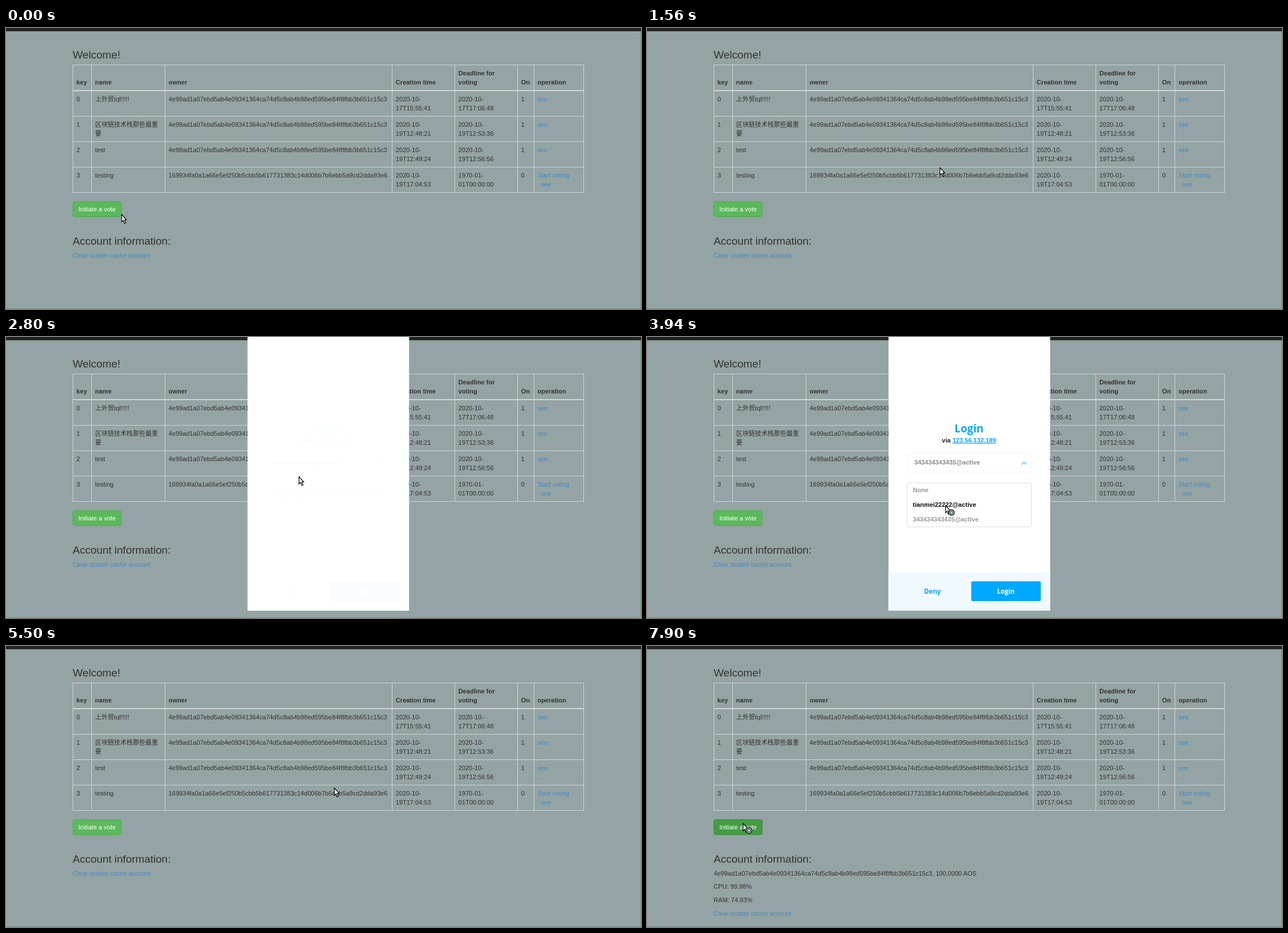
These frames come from a looping animation (1124 px wide and 498 px high, 8000 ms). An HTML page:

```html
<!DOCTYPE html>
<html lang="en">
<head>
<meta charset="utf-8">
<title>Voting page</title>
<style>
html, body { margin: 0; width: 100%; height: 100%; overflow: hidden; background: #94a3a3; }
svg { display: block; width: 100vw; height: 100vh; }
text { font: 11.11px "Liberation Sans", Arial, "Noto Sans CJK SC", "Noto Sans CJK", sans-serif; fill: #333; white-space: pre; }
.b { font-weight: 700; }
.h { font-size: 19.05px; }
.link { fill: #428bca; }
.white { fill: #fff; }
.grid path { fill: none; stroke: #cfd6d6; }
#popup text { fill: #222; font-weight: 700; }
#popup .blue { fill: #00a8ff; }
#popup .os { font-family: "Open Sans", sans-serif; font-size: 11.5px; }
#popup .title { font-size: 19.05px; }
#popup .white { fill: #fff; }
#popup .note { font-size: 10.32px; font-weight: 400; fill: #999; }
.mid { text-anchor: middle; }
</style>
</head>
<body>
<svg viewBox="0 0 1124 498" preserveAspectRatio="none">
  <rect width="1124" height="498" fill="#94a3a3"/>
  <path d="M1123.5 6V497.5H0" fill="none" stroke="#7f8c8c"/>
  <rect width="1124" height="5.7" fill="#222"/>
  <text class="h" x="118" y="54">Welcome!</text>
  <g id="full" class="grid"></g>
  <g id="empty" class="grid"></g>
  <g id="below">
    <rect id="vote" x="118.5" y="307.8" width="85.5" height="26.5" rx="3"/>
    <text class="white mid" x="161.2" y="325">Initiate a vote</text>
    <text class="h" x="118" y="384">Account information:</text>
    <g id="account"></g>
    <text id="clear" class="link" x="118" y="406.5">Clear scatter cache account</text>
  </g>
  <g id="popup">
    <rect x="427.5" y="-10" width="286" height="495" fill="#fff"/>
    <g id="content">
      <text class="os title blue mid" x="570" y="169">Login</text>
      <text class="mid" x="570" y="187">via <tspan class="blue" text-decoration="underline">123.56.132.189</tspan></text>
      <g id="field">
        <rect x="460.5" y="205.5" width="220" height="34" rx="3" fill="#fff" stroke="#e9e9e9"/>
        <text id="chosen" x="473" y="226"></text>
        <path id="chevron" fill="none" stroke="#00a8ff" stroke-width="1.8"/>
      </g>
      <text class="note mid" x="570" y="274">By logging into this application you will be</text>
      <text class="note mid" x="570" y="286">allowing it to interact with your Scatter.</text>
      <g id="menu">
        <rect x="460.5" y="258.5" width="220" height="78" rx="3" fill="#fff" stroke="#dcdcdc"/>
      </g>
      <rect x="427.5" y="417.5" width="286" height="67.5" fill="#f0f9ff"/>
      <text class="os blue mid" x="505.3" y="455">Deny</text>
      <rect id="login" x="574" y="433" width="123" height="35" rx="2"/>
      <text class="os white mid" x="635.3" y="455">Login</text>
    </g>
  </g>
  <g id="cursor">
    <path d="M.6 .6V13.4L3.5 10.8 5.6 16.2 7.8 15.2 5.7 10H9Z" fill="#fff" stroke="#000" stroke-width="1.2"/>
    <g id="badge" fill="#dcefe6">
      <circle cx="11" cy="13" r="5" stroke="#111" stroke-width="1.4"/>
      <circle cx="11" cy="13" r="2.5" stroke="#1d6b58" stroke-width="1.5"/>
    </g>
  </g>
</svg>
<script>
const $ = id => document.getElementById(id);
const label = (s, x, y, cls = '') => `<text class="${cls}" x="${x}" y="${y}">${s}</text>`;
const opacity = (id, v) => $(id).setAttribute('opacity', +v);
const ramp = (t, from, to) => Math.min(1, Math.max(0, (t - from) / (to - from)));
const within = (t, from, to) => t >= from && t < to;

// Table cells break into lines at "|"
const hash = '4e99ad1a07ebd5ab4e09341364ca74d5c8ab4b98ed595be84f8fbb3b651c15c3';
const heads = ['key', 'name', 'owner', 'Creation time', 'Deadline for voting', 'On', 'operation'];
const rows = [
  ['0', '上外贸tql!!!!!', hash, '2020-10-|17T15:55:41', '2020-10-|17T17:06:48', '1', 'see'],
  ['1', '区块链技术栈那些最重|要', hash, '2020-10-|19T12:48:21', '2020-10-|19T12:53:36', '1', 'see'],
  ['2', 'test', hash, '2020-10-|19T12:49:24', '2020-10-|19T12:56:56', '1', 'see'],
  ['3', 'testing', '169934fa0a1a66e5ef250b5cbb5b617731383c14d006b7b6ebb5a9cd2dda93e6',
    '2020-10-|19T17:04:53', '1970-01-|01T00:00:00', '0', 'Start voting|  see']
];

function table(id, widths, headEnd, body) {
  const scale = 904 / widths.reduce((a, b) => a + b);
  const edges = [118.5];
  widths.forEach((w, i) => edges.push(edges[i] + w * scale));
  const line = y => `M118 ${y}H1023`;
  let d = line(65.5) + line(headEnd - 1) + line(headEnd), out = '';
  edges.forEach(x => d += `M${Math.floor(x) + .5} 65V${headEnd + 45 * body.length}`);
  heads.forEach((s, c) => {
    const lines = body.length ? s.replace('for ', 'for|').split('|') : [s];
    lines.reverse().forEach((l, i) => out += label(l, edges[c] + 6.3, headEnd - 11.5 - 16 * i, 'b'));
  });
  body.forEach((row, r) => {
    d += line(headEnd + 45 * (r + 1));
    row.forEach((cell, c) => cell.split('|').forEach((l, i) =>
      out += label(l, edges[c] + 6.3, headEnd + 18 + 45 * r + 16 * i, c === 6 ? 'link' : '')));
  });
  $(id).innerHTML = `<path d="${d}"/>` + out;
}
table('full', [33, 130, 402, 111, 111, 29, 88], 111.5, rows);
table('empty', heads.map(s => 13.5 + 5.8 * s.length), 95.5, []);

$('account').innerHTML = [hash + ', 100.0000 AOS', 'CPU: 99.98%', 'RAM: 74.83%']
  .map((s, i) => label(s, 118, 406.5 + 23.9 * i)).join('');

const oldName = '343434343435@active', newName = 'tianmei22222@active';
$('menu').innerHTML += ['None', newName, oldName].map((s, i) => label(s, 470.5, 274.8 + 26 * i)).join('');
const items = $('menu').querySelectorAll('text');

// Pointer moves: start, end, destination
const moves = [
  [0, 160, 178, 30], [160, 280, 167, -4], [710, 1120, 518, 247], [3100, 3380, 607, 219],
  [3520, 3800, 528, 298], [4500, 4790, 630, 449], [5070, 5490, 585, 250], [5490, 6050, 314.5, 324],
  [7380, 7740, 169.5, 314]
];
function pointer(t) {
  let x = 204.2, y = 330;
  for (const [from, to, toX, toY] of moves) {
    const k = ramp(t, from, to);
    x += (toX - x) * k;
    y += (toY - y) * k;
  }
  return [x, y];
}

const TICK = 141; // the screen refreshes about seven times a second

function draw(t) {
  const s = Math.floor(t / TICK) * TICK;
  const loading = within(t, 1000, 1560), loggedIn = t >= 6730, open = within(t, 3570, 4630);
  opacity('full', !loading);
  opacity('empty', loading);
  $('below').setAttribute('transform', `translate(0 ${loading ? -197 : 0})`);
  opacity('account', loggedIn);
  $('clear').setAttribute('y', loggedIn ? 478.3 : 406.5);
  $('vote').setAttribute('fill', t >= 7750 ? '#449d44' : '#5cb85c');
  $('vote').setAttribute('stroke', t >= 7750 ? '#398439' : '#4cae4c');

  $('cursor').setAttribute('transform', `translate(${pointer(s)})`);
  opacity('badge', within(t, 3290, 4630) || within(t, 4930, 5200) || t >= 7750);

  const shown = ramp(s, 2390, 2670);
  const zoom = .952 + .048 * shown;
  opacity('popup', within(t, 2550, 5350) && shown);
  $('popup').setAttribute('transform', `translate(570.5 193) scale(${zoom}) translate(-570.5 -193)`);
  opacity('content', ramp(s, 2670, 3040));
  opacity('menu', open && ramp(s, 3430, 3700));
  opacity('field', 1 - .48 * (ramp(s, 3430, 3700) - ramp(s, 4380, 4790)));
  $('chosen').textContent = t < 4630 ? oldName : newName;
  $('chevron').setAttribute('d', open ? 'M662.8 226l4.5-4.5 4.5 4.5' : 'M662.8 220l4.5 4.5 4.5-4.5');
  items.forEach((el, i) => el.style.fill = i === 1 && t >= 3940 ? '#111' : '#999');
  $('login').setAttribute('fill', t >= 4930 ? '#009bec' : '#00a8ff');
}

(function tick() {
  draw(performance.now() % 8000);
  requestAnimationFrame(tick);
})();
</script>
</body>
</html>
```
